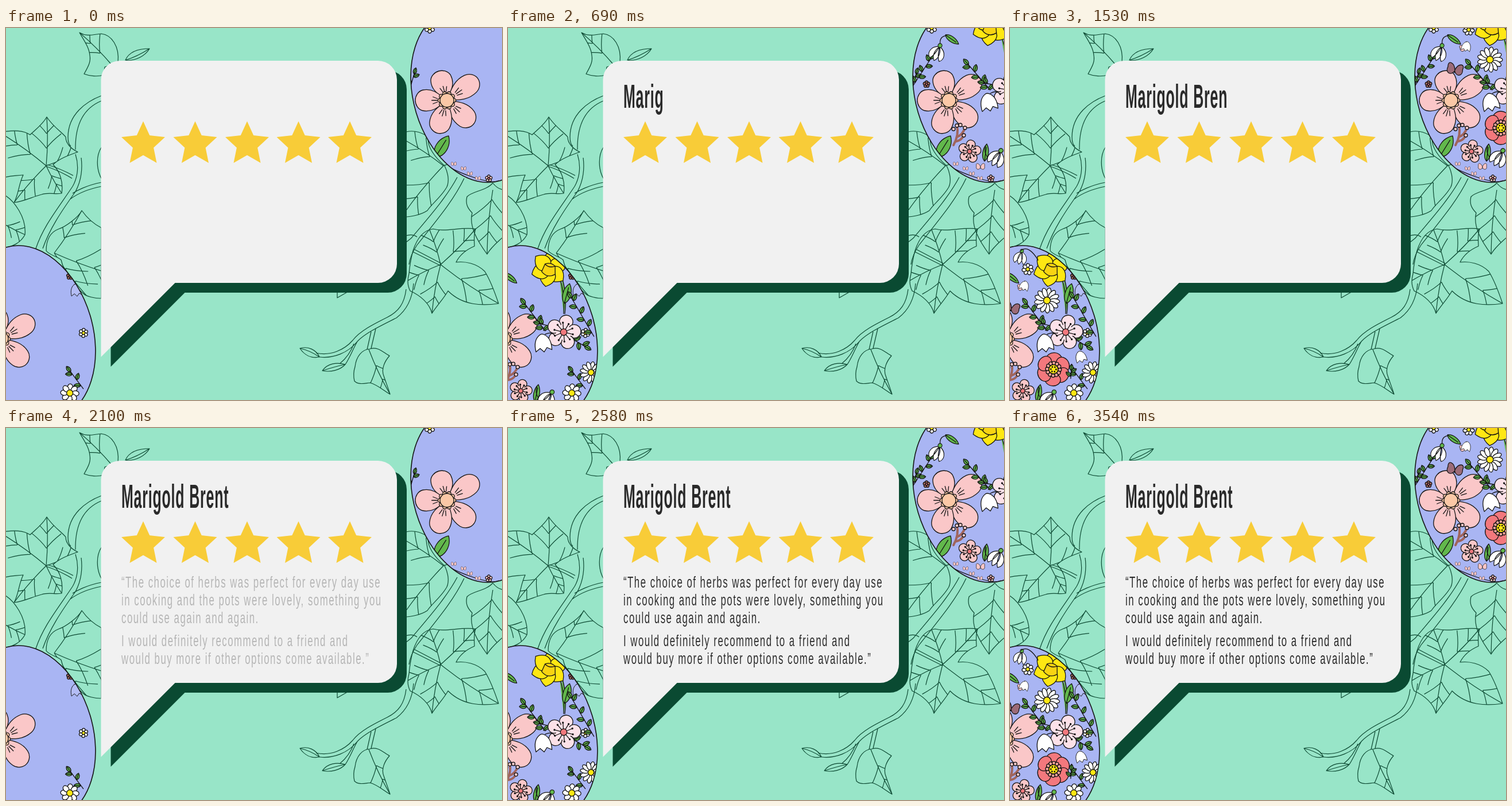
Write an HTML page that moves like this. It is 864 px wide and 648 px high and loops after 4.65 s.

```html
<!DOCTYPE html>
<html lang="en">
<head>
<meta charset="utf-8">
<title>Review</title>
<style>
html, body { margin: 0; width: 100%; height: 100%; overflow: hidden; background: #98e5c8; }
svg { display: block; width: 864px; height: 648px; }
text { font-family: "Liberation Sans", Arial, sans-serif; fill: #2a2a2a; white-space: pre; }
</style>
</head>
<body>
<svg id="stage" viewBox="0 0 864 648" xmlns="http://www.w3.org/2000/svg"></svg>
<script>
const LOOP = 4650, TICK = 30, EGG_LOOP = 2000, EGG_STEP = 250;
const NAME = 'Marigold Brent';
const LINES = [
  [278, '“The choice of herbs was perfect for every day use'],
  [309, 'in cooking and the pots were lovely, something you'],
  [340, 'could use again and again.'],
  [380, 'I would definitely recommend to a friend and'],
  [411, 'would buy more if other options come available.”']
];
const GREEN = '#62b84c', PINK = '#fac7c8', BLUSH = '#fce1e8', RED = '#f3787d',
  YELLOW = '#ffe712', BROWN = '#a0655c', PEACH = '#fbc8a6', WHITE = '#fff';

const f = v => +v.toFixed(1);
const deg = a => a * 180 / Math.PI;
const range = (n, fn) => Array.from({ length: n }, (_, i) => fn(i)).join('');
const path = (d, fill = 'none', extra = '') => `<path d="${d}" fill="${fill}" ${extra}/>`;
const dot = (x, y, r, fill, extra = '') => `<circle cx="${f(x)}" cy="${f(y)}" r="${r}" fill="${fill}" ${extra}/>`;
const at = (x, y, rot, body) => `<g transform="translate(${f(x)} ${f(y)}) rotate(${f(rot)})">${body}</g>`;

// ---- vine line art ----
let clips = 0;
function vineLeaf(outline, bx, by, tips, steps = [.36, .66]) {
  const id = 'leaf' + clips++;
  let veins = '';
  for (const [tx, ty] of tips) {
    const dx = tx - bx, dy = ty - by;
    veins += `M${bx} ${by}Q${f(bx + dx * .5 - dy * .04)} ${f(by + dy * .5 + dx * .04)} ${tx} ${ty}`;
    for (const t of steps) for (const s of [1, -1]) {
      const x = bx + dx * t, y = by + dy * t;
      veins += `M${f(x)} ${f(y)}q${f(dx * .14 - s * dy * .1)} ${f(dy * .14 + s * dx * .1)} ${f(dx * .3 - s * dy * .3)} ${f(dy * .3 + s * dx * .3)}`;
    }
  }
  return `<clipPath id="${id}"><path d="${outline}"/></clipPath>` + path(outline) + path(veins, 'none', `clip-path="url(#${id})"`);
}

const vines = [
  path('M166 118C140 128 108 150 108 190Q108 202 113 206M166 127C142 137 120 160 121 212M121 220C128 242 124 262 116 276C90 315 65 345 52 384M131 226C134 250 129 270 121 285C96 320 76 350 64 384M166 269C140 274 122 284 116 288M166 276C146 280 128 286 112 298M70 241Q96 250 115 262M72 238Q97 246 117 257'),
  path('M166 208C157 222 157 245 166 262'),
  path('M798 262C780 300 750 335 716 378Q704 396 702 412M786 260C768 294 738 328 706 366L696 374M696 362Q708 358 716 364M762 240L786 232M709 390L757 414M712 386L758 410'),
  path('M710 445C708 470 700 490 680 505C650 520 625 532 612 546C596 566 570 576 546 573M697 455C694 480 684 494 664 504C640 516 616 528 604 544C590 560 566 572 540 566M636 529L629 560M644 524L636 558M612 546C604 560 598 576 591 586M606 550C600 566 592 576 582 584'),
  path('M512 558C526 554 540 560 546 573C532 576 520 570 512 558ZQ530 562 546 573M551 597C560 584 576 582 591 586C582 596 566 600 551 597ZQ572 590 591 586M577 456V470L598 458'),
  path('M208 56C214 42 230 36 250 36C243 48 226 58 208 56ZQ228 50 250 36'),
  vineLeaf('M128 8C142 16 152 11 166 10C184 12 198 32 195 60L172 68L170 82C160 85 146 84 136 80C144 66 148 58 146 48C145 34 136 22 128 8Z', 184, 64, [[128, 8]]),
  vineLeaf('M71 155C82 172 98 182 104 190C104 200 112 210 125 216C108 222 92 228 82 238C94 250 100 268 97 288C84 290 74 286 62 290C46 294 32 302 14 304C22 290 22 272 30 256C16 258 6 256 -6 262V181C14 178 30 178 42 186C50 178 64 168 71 155Z', 70, 240, [[71, 155], [125, 216], [14, 304], [-6, 185], [97, 288]]),
  vineLeaf('M132 318C126 330 104 346 92 350C76 356 70 370 70 388C76 396 90 398 96 404C100 420 108 440 134 462C140 468 155 471 166 471V348C154 342 142 332 132 318Z', 84, 392, [[132, 318], [190, 430], [140, 466]]),
  vineLeaf('M-4 290C14 300 36 330 33 360C26 374 10 382 -4 383Z', -14, 335, [[33, 360]]),
  vineLeaf('M690 184C704 176 722 180 736 190C732 206 748 226 764 240C772 256 772 272 766 280C756 296 740 308 734 318C722 326 708 328 690 330Z', 762, 240, [[696, 196], [694, 322]]),
  vineLeaf('M848 270C836 284 812 284 803 294C800 306 804 314 812 322C806 346 822 372 838 394C846 380 858 372 870 360V282C862 282 854 278 848 270Z', 848, 282, [[838, 394]], [.15, .4, .65]),
  vineLeaf('M709 388C716 366 728 352 744 350C766 356 792 346 818 350C814 362 816 372 816 380C802 386 790 396 784 408C800 406 820 410 834 424C844 440 852 462 858 480C830 484 796 484 770 458C762 472 750 484 742 497C738 480 722 466 704 458C698 446 700 436 702 428Q704 406 709 388Z', 757, 412, [[818, 350], [858, 480], [742, 497], [738, 352], [700, 440]]),
  vineLeaf('M608 590C610 572 620 560 634 559C648 554 658 566 668 571C660 580 653 594 658 606C662 618 666 628 669 638C656 630 646 621 634 618C624 619 614 622 607 615Q604 602 608 590Z', 632, 560, [[669, 638]])
].join('');

// ---- egg decorations, placed around the big pink flower ----
function leaf(x1, y1, x2, y2, w = .27) {
  const L = Math.hypot(x2 - x1, y2 - y1), h = f(L * w * 1.3);
  return at(x1, y1, deg(Math.atan2(y2 - y1, x2 - x1)),
    path(`M0 0C${f(L * .2)} ${-h} ${f(L * .7)} ${-h} ${f(L)} 0C${f(L * .7)} ${h} ${f(L * .2)} ${h} 0 0H${f(L * .8)}`, GREEN));
}
function spray(x1, y1, x2, y2, n, len) {
  const a = Math.atan2(y2 - y1, x2 - x1);
  const sprig = (x, y, b) => leaf(x, y, x + len * Math.cos(b), y + len * Math.sin(b), .27);
  return path(`M${x1} ${y1}L${x2} ${y2}`) +
    range(n, i => {
      const t = (i + .6) / n;
      return sprig(x1 + (x2 - x1) * t, y1 + (y2 - y1) * t, a + (i % 2 ? 1 : -1) * .95);
    }) + sprig(x2, y2, a);
}
const petals = (n, r, w, fill) => range(n, i =>
  `<ellipse cy="${f(-r * .62)}" rx="${w}" ry="${f(r * .38)}" fill="${fill}" transform="rotate(${f(360 / n * i)})"/>`);
const bloom = (x, y, n, r, w, fill, mid, midR, rot = 0) =>
  at(x, y, rot, petals(n, r, w, fill) + dot(0, 0, midR, mid));
const stamens = (n, r1, r2) => range(n, i => {
  const c = Math.cos(i * 2 * Math.PI / n), s = Math.sin(i * 2 * Math.PI / n);
  return path(`M${f(c * r1)} ${f(s * r1)}L${f(c * r2)} ${f(s * r2)}`) + dot(c * r2, s * r2, 1, '#111');
});
const blossom = (x, y, r, fill, mid) => at(x, y, 10,
  petals(5, r, f(r * .39), fill) + dot(0, 0, f(r * .45), fill, 'stroke="none"') + stamens(10, r * .2, r * .55) + dot(0, 0, f(r * .19), mid));
const bell = (x, y, s, rot = 0, fill = WHITE) => at(x, y, rot,
  `<g transform="scale(${s})">` + path('M-4 -14C-14 -8 -15 4 -14 14L-6 9L0 16L6 9L14 14C15 4 14 -8 4 -14Q0 -17 -4 -14Z', fill) + '</g>');
const snowdrop = (x, y, s, rot = 0) => at(x, y, rot, `<g transform="scale(${s})">` +
  path('M0 -12C-18 -6 -18 10 -10 16C-4 10 -2 0 0 -12C18 -6 18 10 10 16C4 10 2 0 0 -12C-8 0 -6 12 0 18C6 12 8 0 0 -12Z', WHITE) +
  dot(0, -14, 4, GREEN) + '</g>');
const moth = (x, y, s, fill, rot = 0) => at(x, y, rot, `<g transform="scale(${s})">` +
  path('M0 0C-4 -14 -16 -14 -13 -3C-16 8 -5 12 0 2C5 12 16 8 13 -3C16 -14 4 -14 0 0V5', fill) + '</g>');
const bigPetal = ([x, y]) => {
  const L = Math.hypot(x, y), p = k => f(L * k);
  return at(0, 0, deg(Math.atan2(y, x)),
    path(`M0 0C${p(.2)} -8 ${p(.42)} -22 ${p(.76)} -18C${p(.92)} -16 ${p(1)} -7 ${p(1)} 0C${p(1)} 7 ${p(.92)} 16 ${p(.76)} 18C${p(.42)} 22 ${p(.2)} 8 0 0Z`, PINK) +
    path(`M${p(.3)} 0H${p(.48)}M${p(.3)} -3L${p(.44)} -6M${p(.3)} 3L${p(.44)} 6`));
};
const daisy = (x, y, r, n = 12) => bloom(x, y, n, r, f(r * .19), WHITE, YELLOW, f(r * .27), 8);

const stages = [
  [
    path('M-20 100Q0 118 40 132T90 140'),
    [[-14, -51], [54, -38], [46, 42], [-17, 57], [-55, 0]].map(bigPetal).join(''),
    range(10, i => dot(12 * Math.cos(i * .628), 12 * Math.sin(i * .628), 3.6, PEACH)),
    dot(0, 0, 12, PEACH),
    leaf(-20, 99, 3, 62, .24),
    bloom(-30, -126, 6, 9, 3, WHITE, YELLOW, 3),
    spray(-64, -22, -57, -46, 2, 11),
    [[12, 111], [29, 119], [40, 128], [54, 136]].map(([x, y]) => moth(x, y, .33, PINK)).join(''),
    bloom(73, 136, 5, 6, 2.4, PINK, RED, 1.8),
    bloom(142, -19, 6, 8, 2.7, WHITE, YELLOW, 2.8),
    spray(148, 78, 124, 50, 3, 12),
    bloom(125, 87, 8, 16, 4.6, WHITE, YELLOW, 5.5),
    bell(125, -93, .7, -10, '#b4bdf5'),
    bloom(112, -116, 5, 6, 2.4, BROWN, RED, 1.8)
  ],
  [
    path('M90 -115Q102 -86 102 -50M94 -115Q106 -86 104 -50', GREEN),
    leaf(102, -68, 109, -103, .2),
    at(72, -127, 8, range(6, i => path('M0 0C-19 -6 -17 -22 0 -32C17 -22 19 -6 0 0Z', YELLOW, `transform="rotate(${i * 60})"`)) +
      path('M-9 -6Q0 -12 9 -6L12 8Q0 18 -12 8Z', '#f8d313') + path('M-9 -6Q0 0 9 -6')),
    spray(-62, -26, -32, -72, 5, 12),
    spray(157, -14, 114, -78, 6, 13),
    daisy(156, 49, 19)
  ],
  [
    path('M-15 -96Q-18 -116 4 -112'),
    snowdrop(-20, -84, .88, 22),
    leaf(-6, -114, 17, -98, .17),
    spray(72, -18, 34, -62, 5, 13),
    spray(84, -26, 62, -30, 2, 12),
    spray(118, -8, 142, 4, 3, 13),
    blossom(104, -18, 30, BLUSH, RED),
    path('M72 -12Q82 -18 88 -12'),
    bell(69, 3, 1, -12),
    path('M8 78Q18 60 14 44M14 64Q24 60 28 48M11 72Q22 70 25 62', 'none', `stroke="${BROWN}" stroke-width="4"`),
    [[14, 44], [28, 48], [26, 61], [8, 50], [20, 43]].map(([x, y]) => dot(x, y, 3, PINK)).join(''),
    bloom(-39, -28, 5, 6, 2.6, BROWN, RED, 1.8),
    blossom(36, 89, 20, PINK, RED),
    leaf(62, 106, 66, 76, .17),
    path('M68 100Q60 90 64 80'),
    snowdrop(84, 99, .95, 30),
    moth(55, 116, .55, PINK)
  ],
  [
    bloom(87, 48, 6, 29, 13.5, RED, '#c94d56', 13),
    at(87, 48, 0, range(12, i => dot(11 * Math.cos(i * .524), 11 * Math.sin(i * .524), 3, '#f7a49b')) + dot(0, 0, 8, YELLOW) +
      range(6, i => dot(4.5 * Math.cos(i * 1.05), 4.5 * Math.sin(i * 1.05), .8, '#111'))),
    snowdrop(17, -144, .75, 10),
    path('M17 -155Q30 -166 48 -140'),
    bell(133, 23, .65, -20),
    spray(118, 62, 118, 48, 2, 11)
  ],
  [
    daisy(68, -71, 22, 13),
    moth(7, -53, 1, '#9c6b78', 12),
    bloom(31, -123, 7, 10, 3, WHITE, YELLOW, 3.2),
    moth(24, -91, .6, PINK, -15),
    bell(27, -94, .55, 15)
  ]
];

function egg(id, cx, cy, place) {
  const shape = attrs => `<ellipse cx="${cx}" cy="${cy}" rx="106" ry="155.5" transform="rotate(-16.7 ${cx} ${cy})" ${attrs}/>`;
  return `<clipPath id="${id}">${shape('')}</clipPath>${shape('fill="#a9b5f3"')}
    <g clip-path="url(#${id})"><g transform="${place}" stroke="#141414" stroke-width="1.3" stroke-linejoin="round" stroke-linecap="round">
    ${stages.map((items, i) => `<g data-stage="${i}">${items.join('')}</g>`).join('')}</g></g>
    ${shape('fill="none" stroke="#141414" stroke-width="1.6"')}`;
}

// ---- speech bubble ----
const bubble = 'M198.5 57H648a33 33 0 0 1 33 33V411a33 33 0 0 1-33 33H294.5L165.5 573V90a33 33 0 0 1 33-33Z';
const star = cx => {
  const pts = Array.from({ length: 10 }, (_, i) => {
    const r = i % 2 ? 19 : 40, a = i * Math.PI / 5;
    return f(cx + r * Math.sin(a)) + ',' + f(202.5 - r * Math.cos(a));
  });
  return `<polygon points="${pts.join(' ')}" fill="#f8cc38"/>`;
};
const condensed = (y, squeeze, attrs, str) =>
  `<text transform="translate(201 ${y}) scale(${squeeze} 1)" ${attrs}>${str}</text>`;

const stage = document.getElementById('stage');
stage.innerHTML = `<rect width="864" height="648" fill="#98e5c8"/>
  <g fill="none" stroke="#0d4a33" stroke-width="1.2" stroke-linejoin="round">${vines}</g>
  ${egg('eggA', 816, 117, 'translate(768 126)')}
  ${egg('eggB', 45, 531, 'translate(-8 541) rotate(3.7)')}
  ${path(bubble, '#0a4a32', 'transform="translate(17 17)"')}${path(bubble, '#f1f1f1')}
  ${[239, 329.5, 420, 509.5, 599].map(star).join('')}
  ${condensed(139, .43, 'id="name" font-size="58" font-weight="700" letter-spacing="1.9"', '')}
  <g id="review">${LINES.map(([y, s]) => condensed(y, .6, 'font-size="28" letter-spacing="2.5"', s)).join('')}</g>`;

const nameText = document.getElementById('name');
const review = document.getElementById('review');
const layers = [...stage.querySelectorAll('[data-stage]')];
const clamp = (v, lo, hi) => Math.min(hi, Math.max(lo, v));

function draw(now) {
  const t = Math.floor(now % LOOP / TICK) * TICK;
  const typed = NAME.slice(0, clamp(Math.floor((t - 110) / 105), 0, NAME.length));
  if (nameText.textContent !== typed) nameText.textContent = typed;
  review.setAttribute('opacity', clamp((t - 1890) / 710, 0, 1));
  // the eggs fill up twice, then stay full
  const eggTime = t < 3540 ? t % EGG_LOOP : EGG_LOOP;
  for (const g of layers) {
    g.setAttribute('visibility', eggTime >= g.dataset.stage * EGG_STEP ? 'visible' : 'hidden');
  }
}
const start = performance.now();
function frame() {
  draw(performance.now() - start);
  requestAnimationFrame(frame);
}
frame();
</script>
</body>
</html>
```
